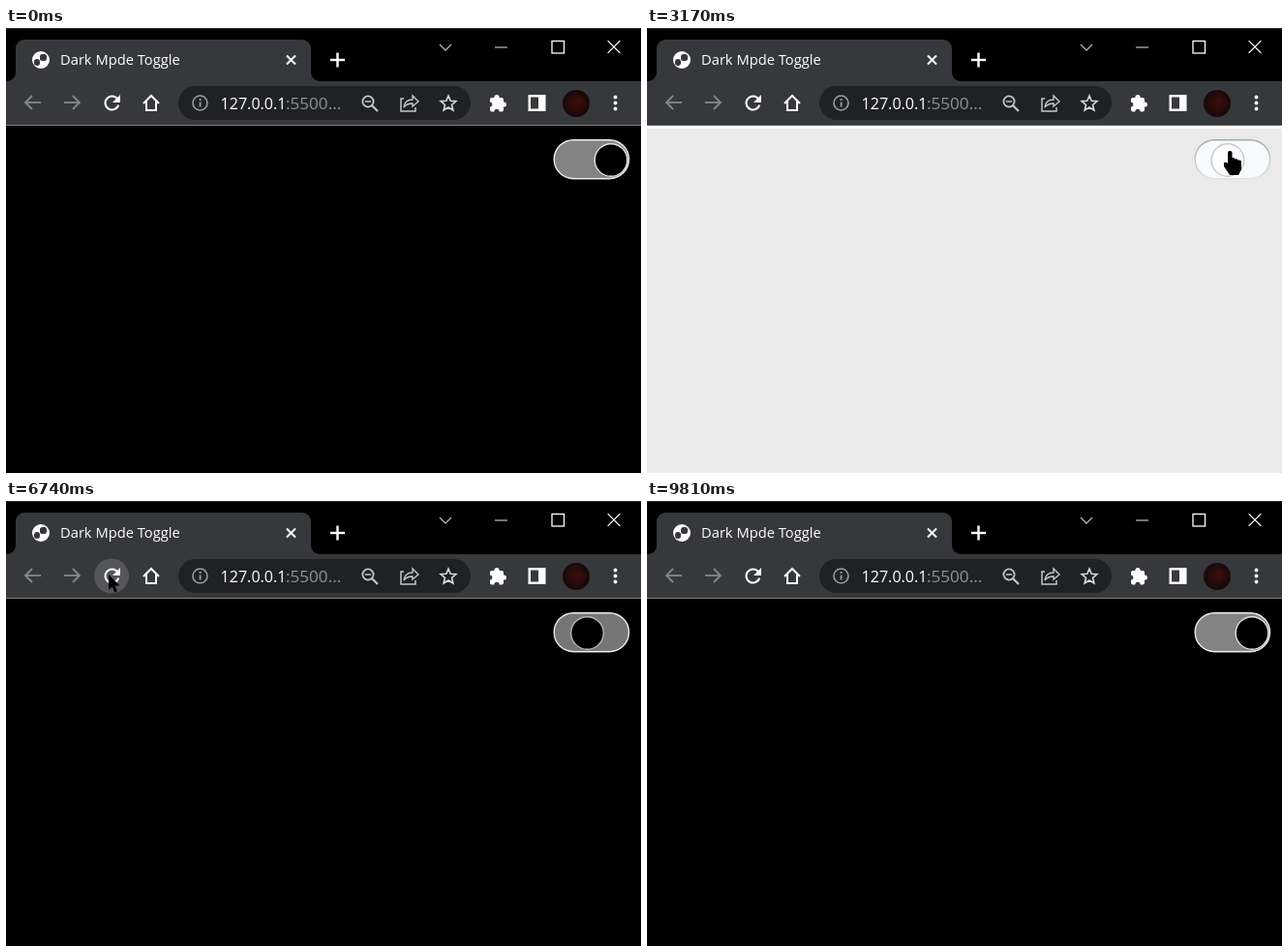
An HTML page with a canvas for the animation above (9.85 s loop, 656x460 px).

```html
<!DOCTYPE html>
<html lang="en">
<head>
<meta charset="utf-8">
<title>Dark mode toggle</title>
<style>
html, body { margin: 0; width: 656px; height: 460px; overflow: hidden; background: #000; }
canvas { display: block; }
</style>
</head>
<body>
<canvas id="stage" width="656" height="460"></canvas>
<script>
const ctx = document.getElementById('stage').getContext('2d');
const LOOP = 9850, SLIDE = 500, TRAVEL = 650;
const KNOB_LEFT = 584, KNOB_RIGHT = 625;
const BAR = '#37383b', WHITE = '#fff', SOFT = '#c4c6c9', MUTED = '#85878a';

// Clicks change the theme; a reload only replays the knob slide.
const events = [
  { at: -SLIDE, type: 'dark' },
  { at: 2865, type: 'light' },
  { at: 3825, type: 'dark' },
  { at: 6540, type: 'reload' },
  { at: 7710, type: 'light' },
  { at: 9140, type: 'dark' }
];

const rest = { x: 520, y: 320 };
const reload = { x: 106, y: 76 };
const toggle = { x: 602, y: 127 };
const corner = { x: 623, y: 148 };
const moves = [
  { at: 0, to: rest },
  { at: 1650, to: toggle },
  { at: 4500, to: rest },
  { at: 5500, to: reload },
  { at: 6860, to: corner },
  { at: 9150, to: rest }
];

const clamp = v => Math.max(0, Math.min(1, v));
const mix = (a, b, p) => a + (b - a) * p;
const smooth = p => p * p * (3 - 2 * p);
const gray = v => `rgb(${v}, ${v}, ${v})`;
const lastBefore = (list, t) => list.findLastIndex(e => e.at <= t);

function paint(fill, stroke, width = 1.4) {
  if (fill) { ctx.fillStyle = fill; ctx.fill(); }
  if (stroke) { ctx.strokeStyle = stroke; ctx.lineWidth = width; ctx.stroke(); }
}

function trace(points, closed) {
  ctx.beginPath();
  points.forEach(([x, y]) => ctx.lineTo(x, y));
  if (closed) ctx.closePath();
}

function line(points, color, width = 1.3) {
  trace(points);
  paint(null, color, width);
}

function disc(x, y, r, fill, stroke, width) {
  ctx.beginPath();
  ctx.arc(x, y, r, 0, Math.PI * 2);
  paint(fill, stroke, width);
}

function pill(x, y, w, h, r, fill, stroke) {
  ctx.beginPath();
  ctx.roundRect(x, y, w, h, r);
  paint(fill, stroke);
}

function box(x, y, w, h, fill) {
  ctx.fillStyle = fill;
  ctx.fillRect(x, y, w, h);
}

function text(value, x, y, size, color) {
  ctx.font = `${size}px "Open Sans", "Noto Sans", sans-serif`;
  ctx.fillStyle = color;
  ctx.fillText(value, x, y);
}

// Two strokes through a point, at the given angle and at right angles to it.
function cross(x, y, r, angle, width) {
  for (const a of [angle, angle + Math.PI / 2]) {
    const dx = r * Math.cos(a), dy = r * Math.sin(a);
    line([[x - dx, y - dy], [x + dx, y + dy]], WHITE, width);
  }
}

function chevron(x, y, dx, dy, color, width) {
  line([[x - dx, y - dy], [x, y], dx > dy ? [x + dx, y - dy] : [x - dx, y + dy]], color, width);
}

function navArrow(x, dir) {
  line([[x - 8 * dir, 77], [x + 7 * dir, 77]], MUTED, 1.8);
  line([[x + dir, 70], [x + 8 * dir, 77], [x + dir, 84]], MUTED, 1.8);
}

function drawTabs() {
  box(0, 0, 656, 55, '#000');
  box(0, 0, 656, 1, '#2a2c2c');
  pill(10, 12, 305, 60, 9, BAR);
  for (const [edge, side] of [[10, -1], [315, 1]]) {
    box(edge + (side < 0 ? -9 : 0), 46, 9, 9, BAR);
    disc(edge + 9 * side, 46, 9, '#000');
  }

  disc(36, 33, 9, WHITE);
  pill(29, 32, 6, 7, 3, BAR);
  pill(35, 27, 7, 7, 2.5, BAR);
  text('Dark Mpde Toggle', 56, 38.2, 14.7, WHITE);
  cross(294.5, 33, 6.4, Math.PI / 4, 2);
  cross(342.5, 33, 7.5, 0, 2.4);
  chevron(454, 23, 6, 6.01 - 0.02, '#b4b4b4');
  box(505, 19.5, 13, 1, '#e4e4e4');
  ctx.strokeStyle = WHITE;
  ctx.lineWidth = 1.3;
  ctx.strokeRect(564, 13.5, 12.5, 12.5);
  cross(628, 19.5, 9, Math.PI / 4, 1.3);
}

function drawAddressBar() {
  pill(178, 60, 302, 35, 17.5, '#202124');
  disc(200.5, 77.5, 7.5, null, '#9a9da1', 1.6);
  box(199.7, 76.5, 1.8, 5, '#9a9da1');
  box(199.7, 73, 1.8, 2, '#9a9da1');
  text('127.0.0.1', 221.5, 83.8, 16.1, WHITE);
  text(':5500...', 289, 83.8, 17.1, '#909296');

  disc(374, 76, 5.6, null, SOFT, 1.8);
  line([[378, 80], [384, 86]], SOFT, 2.2);
  line([[371, 76], [377, 76]], SOFT, 1.5);

  line([[411, 73], [408, 73], [408, 86], [423, 86], [423, 82]], SOFT, 1.5);
  ctx.beginPath();
  ctx.moveTo(411, 82);
  ctx.quadraticCurveTo(412, 74, 420, 74);
  ctx.lineTo(420, 70);
  ctx.lineTo(426, 76);
  ctx.lineTo(420, 81);
  ctx.lineTo(420, 78);
  ctx.quadraticCurveTo(414, 78, 411, 82);
  paint(null, SOFT);

  trace(Array.from({ length: 10 }, (_, i) => {
    const a = i * Math.PI / 5 - Math.PI / 2, r = i % 2 ? 3.7 : 8.3;
    return [457 + r * Math.cos(a), 78.3 + r * Math.sin(a)];
  }), true);
  paint(null, '#d6d8da', 1.6);
}

function drawToolbar(hover) {
  box(0, 55, 656, 46, BAR);
  navArrow(28, -1);
  navArrow(68, 1);

  if (hover) disc(109, 77.5, 18, '#55565a');
  ctx.beginPath();
  ctx.arc(109.5, 77.5, 7, 0.3, Math.PI * 1.8);
  paint(null, WHITE, 2.1);
  trace([[118, 69], [118, 77], [110, 77]]);
  paint(WHITE);

  line([[142, 78], [150, 70], [158, 78]], WHITE, 2);
  line([[145, 76], [145, 85], [155, 85], [155, 76]], WHITE, 2);
  drawAddressBar();

  pill(500, 72, 14, 14.5, 2, WHITE);
  for (let i = 0; i < 4; i++) {
    const a = (i - 1) * Math.PI / 2;
    disc(507 + 7.3 * Math.cos(a), 79 + 7.3 * Math.sin(a), 2.6, i < 2 ? WHITE : BAR);
  }
  box(539.5, 69, 18, 17, WHITE);
  box(542, 71.5, 8, 12, BAR);

  const glow = ctx.createRadialGradient(591, 76, 2, 589, 78, 14);
  glow.addColorStop(0, '#3a0e0c');
  glow.addColorStop(1, '#150808');
  disc(589, 78, 14, glow);
  for (let i = -1; i <= 1; i++) disc(629.5, 77.5 + 6 * i, 1.9, WHITE);
}

function themeAt(t) {
  const { at, type } = events[lastBefore(events, t)];
  const p = clamp((t - at) / SLIDE);
  const toLight = type === 'light';
  const light = toLight ? 1 - (1 - p) ** 2.65 : type === 'dark' ? (1 - p) ** 2 : 0;
  const knob = toLight ? mix(KNOB_RIGHT, KNOB_LEFT, p) : mix(KNOB_LEFT, KNOB_RIGHT, p);
  return { type, p, light, knob };
}

function trackColor({ type, p }) {
  const settled = 131;
  if (type === 'light') {
    const q = clamp(p / 0.4);
    return `rgb(${mix(settled, 245, q)}, ${mix(settled, 252, q)}, ${mix(settled, 254, q)})`;
  }
  if (type === 'reload') return gray(mix(110, settled, p));
  return gray(p < 0.4 ? mix(252, 98, p / 0.4) : mix(98, settled, (p - 0.4) / 0.6));
}

function drawPage(theme) {
  const { light, knob, type, p } = theme;
  box(0, 100, 656, 360, gray(255 * light));
  box(0, 100, 656, 1, gray(mix(128, 90, light)));
  if (light > 0.9) box(0, 101, 656, 3, WHITE);

  const edge = ctx.createLinearGradient(0, 115, 0, 156);
  edge.addColorStop(0, gray(mix(236, 160, light)));
  edge.addColorStop(1, gray(mix(236, 225, light)));
  pill(566.2, 115.7, 77.3, 40, 20, trackColor(theme), edge);

  const rim = type === 'reload' ? mix(150, 226, p) : mix(226, 198, light);
  disc(knob, 136.5, 16.8, light > 0.7 ? '#fdfcfe' : '#000', gray(rim));
}

function pointerAt(t) {
  const i = lastBefore(moves, t);
  const from = moves[Math.max(0, i - 1)].to, { at, to } = moves[i];
  const p = smooth(clamp((t - at) / TRAVEL));
  return { x: mix(from.x, to.x, p), y: mix(from.y, to.y, p) };
}

function drawPointer({ x, y }) {
  const overToggle = x > 566 && x < 644 && y > 115 && y < 156;
  ctx.save();
  ctx.translate(x, y);
  if (overToggle) {
    pill(-2, 0, 4.5, 16, 2.2, '#000');
    for (let i = 0; i < 3; i++) pill(1 + 3.3 * i, 7 + 1.2 * i, 4.4, 11, 2, '#000');
    trace([[-6, 12], [-3, 12], [0, 15], [12, 14], [12, 19], [9, 25], [0, 25], [-6, 16]]);
  } else {
    trace([[0, 0], [0, 16], [3.7, 12.6], [6.4, 18.5], [9, 17.3], [6.3, 11.5], [11.5, 11.5]]);
  }
  paint('#000');
  ctx.restore();
}

function draw() {
  const t = performance.now() % LOOP;
  const pointer = pointerAt(t);
  const hover = Math.hypot(pointer.x - 109, pointer.y - 77.5) < 18;
  drawTabs();
  drawToolbar(hover);
  drawPage(themeAt(t));
  drawPointer(pointer);
  requestAnimationFrame(draw);
}
requestAnimationFrame(draw);
</script>
</body>
</html>
```
